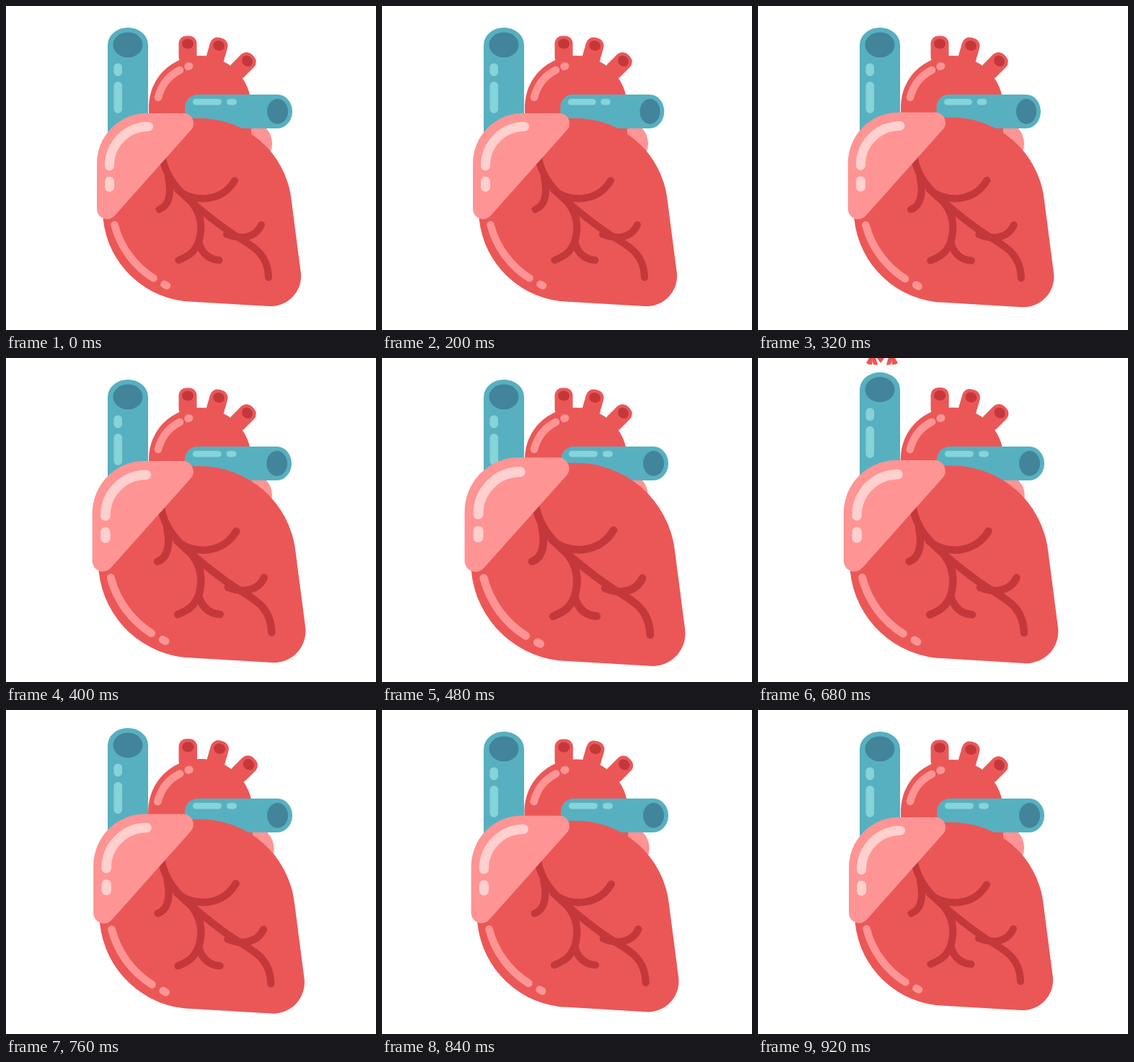
Write an HTML page that moves like this. It is 513 px wide and 450 px high and loops after 960 ms.

```html
<!DOCTYPE html>
<html lang="en">
<head>
<meta charset="utf-8">
<title>Beating heart</title>
<style>
  html, body { margin: 0; width: 100%; height: 100%; overflow: hidden; background: #fff; }
  svg { display: block; width: 100%; height: 100%; }
  .red { fill: #eb5757; }
  .pink { fill: #ff9494; }
  .dark { fill: #c4383c; }
  .pale { fill: #ffd0cd; }
  .blue { fill: #57b0c0; }
  .deep { fill: #42849a; }
  .sky { fill: #87d3da; }
  .line { fill: none; stroke-linecap: round; stroke-linejoin: round; }
  .shine { stroke: #ff9494; stroke-width: 10.5; }
  .vessels { stroke: #c4383c; stroke-width: 10; }
</style>
</head>
<body>
<svg viewBox="0 0 513 450">
  <defs>
    <g id="tube">
      <rect class="red" x="-12.5" y="-11" width="25" height="40" rx="10.5"/>
      <ellipse class="dark" rx="8" ry="7"/>
    </g>
    <g id="spray">
      <path d="M-6 0L-12 -1Q-15 -12 -13 -20Q-8 -10 -6 0Z"/>
      <path d="M-22 -3Q-18 -10 -14 -17Q-12 -8 -14 -1Q-18 0 -22 -3Z"/>
    </g>
  </defs>

  <g id="aorta">
    <circle class="pink" cx="338" cy="191" r="31"/>
    <use href="#tube" x="252" y="52.5"/>
    <use href="#tube" transform="translate(295 55) rotate(16)"/>
    <use href="#tube" transform="translate(334.5 76.5) rotate(45)"/>
    <path class="red" d="M198 140A71 71 0 0 1 340 140V190H198Z"/>
    <path class="line shine" d="M211 127C215 111 225 97 241 89M252.5 84L254 83.5"/>
  </g>

  <g id="cava">
    <path class="blue" d="M141 54A28 24 0 0 1 197 54V200H141Z"/>
    <ellipse class="deep" cx="169" cy="54" rx="20.5" ry="17.5"/>
    <rect class="sky" x="149.5" y="79.5" width="11.5" height="18" rx="5.75"/>
    <rect class="sky" x="149.5" y="105" width="11.5" height="44" rx="5.75"/>
  </g>

  <g id="pulmonary">
    <path class="blue" d="M248 170V141A18 18 0 0 1 266 123H376.5A20.5 23.5 0 0 1 376.5 170Z"/>
    <ellipse class="deep" cx="376.5" cy="146.5" rx="14.5" ry="17.5"/>
    <rect class="sky" x="259" y="129" width="40" height="8.5" rx="4.25"/>
    <rect class="sky" x="306" y="129" width="14" height="8.5" rx="4.25"/>
  </g>

  <g id="body">
    <path class="red" d="M134 284A128 128 0 0 1 262 156H268A127.5 127.5 0 0 1 395.5 268L408.7 369.7A42 42 0 0 1 364.5 417L247 410A128 128 0 0 1 134 284Z"/>
    <g class="line vessels">
      <path d="M217 211C222 238 238 256 258 273S299 307 320 320S363 343 364 377"/>
      <path d="M225 238C230 260 226 278 212.5 282.5"/>
      <path d="M238 255C258 273 298 274 317 242.5"/>
      <path d="M256 271C270 287 274 305 267 328C261 342 254 347 239.5 353"/>
      <path d="M267 328C272 345 282 352 295.5 353"/>
      <path d="M306 317C325 325 346 322 354 304"/>
    </g>
    <path class="line shine" d="M150.5 304A124 124 0 0 0 204.5 378M219.5 386.5L223 388.5"/>
    <path class="pink" d="M126 219A69 70 0 0 1 195 149H246A14 14 0 0 1 256.4 172.4L150.4 291.4A14 14 0 0 1 126 282Z"/>
    <path class="line" stroke="#ffd0cd" stroke-width="13" d="M143.5 222A54 54 0 0 1 197.5 167.5"/>
    <rect class="pale" x="137" y="237" width="13" height="21" rx="6.5"/>
  </g>

  <g id="drops" class="red">
    <path d="M-2 -3L-8 -11Q-10 -24 -2 -26Q6 -24 4 -11Z"/>
    <use href="#spray"/>
    <use href="#spray" transform="scale(-1 1)"/>
  </g>
</svg>
<script>
const LOOP = 960, STEP = 40;

// Each track is a list of [time, value], linear in between.
const tracks = {
  squeeze: [[100, 1], [250, 0.95], [420, 1]],
  beat: [[300, 1], [500, 1.09], [920, 1]],
  lift: [[500, 0], [670, -10.8], [840, 0]],
  swell: [[640, 1], [780, 1.023], [920, 1]],
  spurt: [[600, 45], [680, 10], [760, -25]]
};

const part = id => document.getElementById(id);
const move = (id, value) => part(id).setAttribute("transform", value);
const zoom = (x, y, sx, sy = sx) =>
  `translate(${x} ${y}) scale(${sx} ${sy}) translate(${-x} ${-y})`;

function at(track, t) {
  const next = track.findIndex(key => key[0] > t);
  if (next === 0) return track[0][1];
  if (next < 0) return track[track.length - 1][1];
  const [t0, a] = track[next - 1], [t1, b] = track[next];
  return a + (b - a) * (t - t0) / (t1 - t0);
}

function draw(now) {
  const t = Math.floor((now % LOOP) / STEP) * STEP;
  move("pulmonary", zoom(225, 146.5, at(tracks.squeeze, t), 1));
  move("body", zoom(267.6, 283, at(tracks.beat, t)));
  move("cava", `translate(0 ${at(tracks.lift, t)})`);
  move("aorta", zoom(240, 115, at(tracks.swell, t)));
  move("drops", `translate(172 ${at(tracks.spurt, t)})`);
  part("drops").style.display = t >= 600 && t < 760 ? "" : "none";
}

const start = performance.now();
function tick() {
  draw(performance.now() - start);
  requestAnimationFrame(tick);
}
tick();
</script>
</body>
</html>
```
